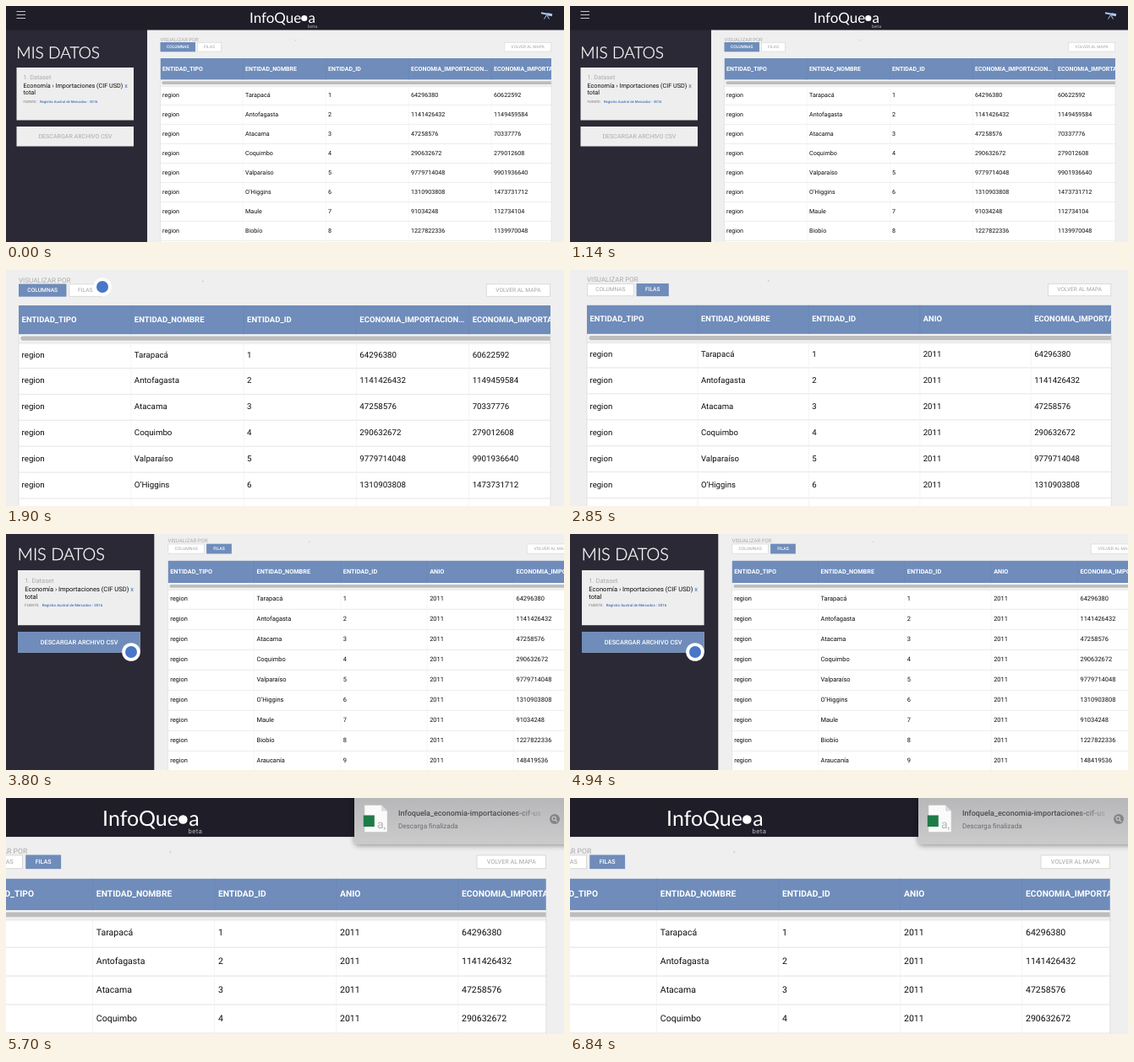
An HTML page that plays this animation: 660x280 px, repeating every 7.6 s.

```html
<!DOCTYPE html>
<html lang="es">
<head>
<meta charset="utf-8">
<title>Mis datos</title>
<style>
html, body { margin: 0; width: 100%; height: 100%; overflow: hidden; background: #efefef; }
svg { display: block; width: 660px; height: 280px; font-family: Roboto, sans-serif; text-rendering: geometricPrecision; }
.cam, .cols, .rows, .tap1, .tap2, .toast { animation: 7.6s step-end infinite; }
.cam { animation-name: cam; transform-origin: 0 0; }
.cols { animation-name: cols; }
.rows { animation-name: rows; }
.tap1 { animation-name: tap1; }
.tap2 { animation-name: tap2; }
.toast { animation-name: toast; }

/* hard cuts between zoomed views of the same page */
@keyframes cam {
  0%    { transform: translate(182.5px, 62px) scale(1) translate(-182.5px, -62px); }
  25%   { transform: translate(15px, 42px) scale(1.36, 1.344) translate(-182.5px, -62px); }
  37.5% { transform: translate(20px, 41.5px) scale(1.341, 1.344) translate(-182.5px, -62px); }
  50%   { transform: translate(191.5px, 31.5px) scale(1.044) translate(-182.5px, -62px); }
  75%, 100% { transform: translate(-41px, 95.5px) scale(1.47, 1.475) translate(-182.5px, -62px); }
}
@keyframes cols  { 0% { visibility: visible; } 37.5%, 100% { visibility: hidden; } }
@keyframes rows  { 0% { visibility: hidden; } 37.5%, 100% { visibility: visible; } }
@keyframes tap1  { 0% { visibility: hidden; } 25% { visibility: visible; } 37.5%, 100% { visibility: hidden; } }
@keyframes tap2  { 0% { visibility: hidden; } 50% { visibility: visible; } 75%, 100% { visibility: hidden; } }
@keyframes toast { 0% { visibility: hidden; } 75%, 100% { visibility: visible; } }

.btn { fill: #fff; stroke: #d4d4d4; stroke-width: .6; }
.on { fill: #6f8cba; }
.lbl { font-size: 4.9px; fill: #a3a3a3; text-anchor: middle; }
.lbl.act { fill: #fff; font-weight: 500; }
.head { font-size: 7px; font-weight: 700; fill: #fff; }
.cell { font-size: 7.15px; fill: #0c0c0c; }
.big { font-size: 7.1px; text-anchor: middle; }
.brand { font: 17px Lato, sans-serif; fill: #fff; }
.title { font: 300 19.1px Lato, sans-serif; fill: #fff; stroke: #fff; stroke-width: .3; }
.note { font-size: 7.25px; }
.tiny { font-size: 4.2px; }
</style>
</head>
<body>
<svg viewBox="0 0 660 280">
  <defs>
    <clipPath id="table"><rect x="182.5" y="62" width="462.5" height="240"/></clipPath>
    <linearGradient id="shade" x2="0" y2="1">
      <stop stop-color="#e2e2e2"/><stop offset="1" stop-color="#fff"/>
    </linearGradient>
    <linearGradient id="glass" x2="0" y2="1">
      <stop stop-color="#b4b4b6"/><stop offset="1" stop-color="#cbcbcc"/>
    </linearGradient>
    <linearGradient id="fade" gradientUnits="userSpaceOnUse" x1="595" x2="637">
      <stop stop-color="#4a4a4c"/><stop offset="1" stop-color="#4a4a4c" stop-opacity=".1"/>
    </linearGradient>
    <filter id="drop" x="-10%" y="-10%" width="120%" height="140%">
      <feDropShadow dx="0" dy="1.5" stdDeviation="3" flood-opacity=".4"/>
    </filter>
    <g id="tap"><circle r="10.8" fill="#fff"/><circle r="7" fill="#4a76c9"/></g>
  </defs>

  <rect width="660" height="280" fill="#efefef"/>
  <g class="cam">
    <rect x="-50" y="28" width="217" height="300" fill="#2a2935"/>
    <rect x="-50" y="-50" width="760" height="78.5" fill="#1e1d28"/>
    <path d="M12.5 6.5h10.5M12.5 10.5h10.5M12.5 14.5h10.5" stroke="#d8d8dc" stroke-width=".9"/>
    <text class="brand" x="288" y="19.5">InfoQue</text>
    <circle cx="352.8" cy="14.5" r="3.6" fill="#fff"/>
    <text class="brand" x="357.5" y="19.5">a</text>
    <text x="357" y="25.5" font-size="5.2" fill="#b9b9c0" letter-spacing=".3">beta</text>
    <g fill="none" stroke="#a9c8ee">
      <path d="M633 8.2l8 1.6" stroke-width="2"/><path d="M640.5 9.7l5.5 1" stroke-width="3.2"/>
      <path d="M639.5 10.5l-3 5M639.5 10.5l3 5" stroke-width="1"/>
    </g>

    <text class="title" x="12.3" y="61.6">MIS DATOS</text>
    <rect x="12.5" y="73" width="138.5" height="62.5" fill="#eee"/>
    <text class="note" x="20.5" y="87.2" fill="#aaa">1. Dataset</text>
    <text class="note" x="20.5" y="97.2" fill="#0c0c0c">Economía › Importaciones (CIF USD) <tspan fill="#3a6fa8">x</tspan></text>
    <text class="note" x="20.5" y="105.2" fill="#0c0c0c">total</text>
    <text class="tiny" x="20.5" y="114.6" fill="#777">FUENTE:</text>
    <text class="tiny" x="40" y="114.6" font-weight="500" fill="#4a70b4">Registro Austral de Mercados - 2016</text>
    <rect x="12.5" y="143" width="138.5" height="23.5" fill="#eee"/>
    <text class="big" x="82" y="157.4" fill="#aaa">DESCARGAR ARCHIVO CSV</text>
    <g class="tap2">
      <rect class="on" x="12.5" y="143" width="138.5" height="23.5"/>
      <text class="big" x="82" y="157.4" fill="#fff" font-weight="500">DESCARGAR ARCHIVO CSV</text>
    </g>

    <text x="182.5" y="41.8" font-size="5.9" fill="#aaa">VISUALIZAR POR</text>
    <rect x="342" y="40.3" width="1.2" height=".8" fill="#bbb"/>
    <rect class="btn" x="589.3" y="43.3" width="55.4" height="10.7"/>
    <text class="lbl" x="617" y="50.1">VOLVER AL MAPA</text>

    <g clip-path="url(#table)">
      <rect x="182.5" y="62" width="462.5" height="240" fill="#fff"/>
      <rect class="on" x="182.5" y="62" width="462.5" height="25.6"/>
      <rect x="182.5" y="87.6" width="462.5" height="6.8" fill="#f4f4f4"/>
      <rect x="182.5" y="94.4" width="462.5" height="2.4" fill="url(#shade)"/>
      <rect x="184.3" y="89.2" width="480" height="3.8" rx="1.9" fill="#bdbdbd"/>
      <g id="grid"></g>
      <g class="cols" id="cols"></g>
      <g class="rows" id="rows"></g>
    </g>
    <path d="M182.5 87.6V300M645 87.6V300" stroke="#dedede" stroke-width=".6"/>
    <g class="cols" id="colsTabs"></g>
    <g class="rows" id="rowsTabs"></g>
  </g>

  <use href="#tap" class="tap1" x="114" y="20"/>
  <use href="#tap" class="tap2" x="148" y="140"/>

  <g class="toast">
    <path d="M412-10H670V55H417a5 5 0 0 1-5-5z" fill="url(#glass)" filter="url(#drop)"/>
    <path d="M424 8.5h20l7 7v25h-27z" fill="#fafafa" stroke="#c4c4c4" stroke-width=".5"/>
    <path d="M444 8.5v7h7z" fill="#dcdcdc"/>
    <text x="439" y="36" font-size="14" fill="#b5b5b5">a,</text>
    <rect x="422.8" y="20.5" width="13" height="13.5" fill="#1f7a48"/>
    <text x="464" y="21" font-size="9" font-weight="500" fill="url(#fade)">Infoquela_economia-importaciones-cif-us</text>
    <text x="464" y="35.7" font-size="8.1" fill="#6c6c6e">Descarga finalizada</text>
    <circle cx="649" cy="25" r="6" fill="#858587"/>
    <g fill="none" stroke="#c4c4c5" stroke-width="1.2"><circle cx="648.3" cy="24.3" r="2.2"/><path d="M650 26l2.300 2.300"/></g>
  </g>
</svg>
<script>
const LEFT = 182.5, COL = 98, TOP = 94.4, ROW = 23;
const ECON = 'ECONOMIA_IMPORTACION…';
const data = [
  ['Tarapacá', 64296380, 60622592],
  ['Antofagasta', 1141426432, 1149459584],
  ['Atacama', 47258576, 70337776],
  ['Coquimbo', 290632672, 279012608],
  ['Valparaíso', 9779714048, 9901936640],
  ['O’Higgins', 1310903808, 1473731712],
  ['Maule', 91034248, 112734104],
  ['Biobío', 1227822336, 1139970048],
  ['Araucanía', 148419536, '']
];

function add(id, tag, attrs, text = '') {
  const el = document.createElementNS('http://www.w3.org/2000/svg', tag);
  for (const k in attrs) el.setAttribute(k, attrs[k]);
  el.textContent = text;
  document.getElementById(id).append(el);
}

function line(d, stroke) {
  add('grid', 'path', { d, stroke, 'stroke-width': 0.6 });
}

function fill(id, heads, toCells) {
  const put = (cls, col, y, text) => add(id, 'text', { class: cls, x: LEFT + 2.6 + col * COL, y }, text);
  heads.forEach((h, c) => put('head', c, 76.8, h));
  data.forEach((d, r) => toCells(d, r + 1).forEach((v, c) => put('cell', c, TOP + ROW * r + 13.4, v)));
}

function tabs(id, active) {
  [['COLUMNAS', 182.5, 41.5], ['FILAS', 226.2, 28.5]].forEach(([name, x, w], i) => {
    const on = i === active;
    const box = on ? { class: 'on', x, y: 43, width: w, height: 11.3 }
                   : { class: 'btn', x: x + 0.3, y: 43.3, width: w - 0.6, height: 10.7 };
    add(id, 'rect', box);
    add(id, 'text', { class: on ? 'lbl act' : 'lbl', x: x + w / 2, y: 50.1 }, name);
  });
}

data.forEach((_, r) => line(`M${LEFT} ${TOP + ROW * (r + 1)}h462.5`, '#dfdfdf'));
for (let c = 1; c < 5; c++) {
  const x = LEFT + COL * c - 0.3;
  line(`M${x} 62v25.6`, '#6b88b6');
  line(`M${x} ${TOP}V300`, '#f2f2f2');
}

const base = ['ENTIDAD_TIPO', 'ENTIDAD_NOMBRE', 'ENTIDAD_ID'];
fill('cols', [...base, ECON, ECON], ([name, a, b], id) => ['region', name, id, a, b]);
fill('rows', [...base, 'ANIO', ECON], ([name, a], id) => ['region', name, id, 2011, a]);
tabs('colsTabs', 0);
tabs('rowsTabs', 1);
</script>
</body>
</html>
```
